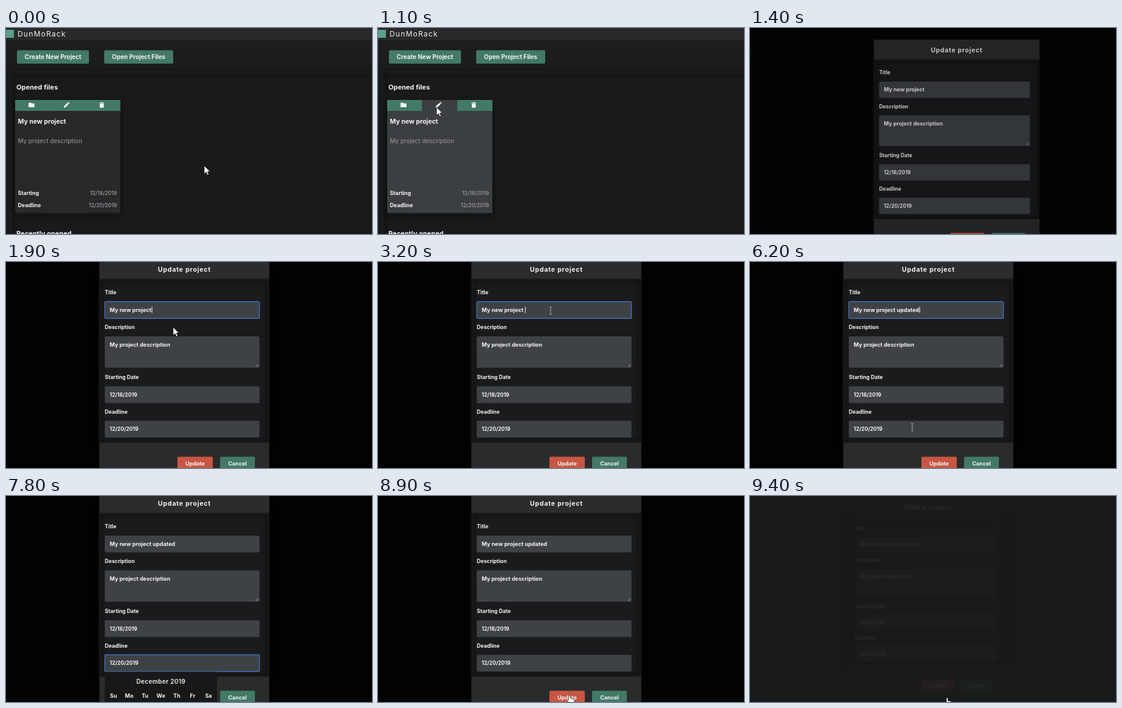
Recreate the animation shown at these times as an HTML page. Size 600 by 338 pixels, loop 9500 ms.

```html
<!DOCTYPE html>
<html lang="en">
<head>
<meta charset="utf-8">
<title>Project board</title>
<style>
  html, body { margin: 0; width: 100%; height: 100%; overflow: hidden; background: #1b1c1d; }
  svg { display: block; width: 600px; height: 338px; }
  text { font-family: Inter, "Open Sans", sans-serif; font-weight: 700; fill: #f1f2f2; white-space: pre; }
</style>
</head>
<body>
<svg viewBox="0 0 600 338" xmlns="http://www.w3.org/2000/svg">
  <defs>
    <filter id="soft" x="-20%" y="-20%" width="140%" height="140%"><feGaussianBlur stdDeviation="5"/></filter>
  </defs>
  <rect width="600" height="338" fill="#1c1d1e"/>
  <g id="page"></g>
  <rect id="shade" width="600" height="338" fill="#020203"/>
  <g id="modal"></g>
  <g id="cursor">
    <path id="arrow" d="M0 0V13.2L3.1 10.4 5.3 15.2 7.5 14.2 5.3 9.6H9.4Z" fill="#fff" stroke="#111" stroke-width=".7"/>
    <path id="beam" d="M-2 -6H-.6L0 -5.4.6 -6H2M0 -5.4V5.4M-2 6H-.6L0 5.4.6 6H2" fill="none" stroke="#b4b8ba" stroke-width=".9"/>
    <path id="hand" d="M0 1Q0 0 1.2 0T2.4 1V5L4.6 5.3 8.4 6.4Q9.6 7 9.4 9L8 14H2L-2.4 8.6Q-2.6 7 -1.2 7.2L0 8.2Z" fill="#fff" stroke="#111" stroke-width=".6"/>
  </g>
</svg>
<script>
const LOOP = 9500, STEP = 100;
const TEAL = "#437968", FIELD = "#3e4244";
const $ = id => document.getElementById(id);

const rect = (x, y, w, h, fill, extra = "") =>
  `<rect x="${x}" y="${y}" width="${w}" height="${h}" fill="${fill}" ${extra}/>`;

// Blurred dark rim of a sunken area.
const rim = (x, y, w, h) =>
  rect(x, y, w, h, "none", 'stroke="#0e0e0f" stroke-width="7" filter="url(#soft)" opacity=".5"');

// Text placed by the vertical middle of its capitals.
const label = (str, x, mid, size, extra = "") =>
  `<text x="${x}" y="${(mid + size * .36).toFixed(2)}" font-size="${size}" ${extra}>${str}</text>`;

const button = (str, x, y, w, h, size, fill) =>
  rect(x, y, w, h, fill, 'rx="2"') +
  label(str, x + w / 2, y + h / 2, size, 'text-anchor="middle"');

const cardDate = (name, date, mid) =>
  label(name, 19.5, mid, 8.8) +
  label(date, 182, mid, 8.5, 'text-anchor="end" style="fill:#909294;font-weight:600"');

$("page").innerHTML =
  rect(8, 73, 700, 400, "#1a1a1b") +
  rim(8, 73, 700, 400) +
  rect(0, 0, 700, 20.5, "#28292b") +
  rect(0, 3, 13, 13, "#5aa18b") +
  label("DunMoRack", 19, 10, 12, 'letter-spacing="1.2" style="font-weight:400"') +
  button("Create New Project", 18, 36.5, 118, 22, 9.9, TEAL) +
  button("Open Project Files", 161, 36.5, 113, 22, 9.9, TEAL) +
  label("Opened files", 17, 97, 11) +
  rect(16, 121, 172, 186, "#0d0d0e", 'filter="url(#soft)" opacity=".7"') +
  rect(15, 118, 172.5, 185.5, "#28292b", 'id="card" rx="2"') +
  rect(15, 118, 57, 18, TEAL) +
  rect(72, 118, 58, 18, TEAL, 'id="edit"') +
  rect(130, 118, 57.5, 18, TEAL) +
  `<g fill="#fff">
    <path d="M37 123.2Q37 122.6 37.8 122.6H40.7L41.8 123.7H45.8Q46.6 123.7 46.6 124.5V129.4Q46.6 130 45.8 130H37.8Q37 130 37 129.4Z"/>
    <path d="M94.8 130.6V128.6L100.4 123 102.5 125.1 96.9 130.6ZM101 122.4 101.9 121.6Q102.3 121.3 102.7 121.6L103.9 122.8Q104.2 123.2 103.9 123.6L103.1 124.5Z"/>
    <path d="M153.2 122.5H155.3L155.9 121.8H158.1L158.7 122.5H160.8V123.6H153.2ZM153.8 124.3H160.2V130Q160.2 130.8 159.4 130.8H154.6Q153.8 130.8 153.8 130Z"/>
  </g>` +
  label("My new project", 19.5, 153, 10.5) +
  label("My project description", 19.5, 185, 9.8, 'style="fill:#8b8d8f;font-weight:500"') +
  cardDate("Starting", "12/18/2019", 271) +
  cardDate("Deadline", "12/20/2019", 291) +
  label("Recently opened", 17, 337, 11);

const fields = [
  { name: "Title", y: 65, h: 27.5, value: "My new project", size: 9.1 },
  { name: "Description", y: 122, h: 51.5, value: "My project description", size: 9 },
  { name: "Starting Date", y: 204, h: 27.5, value: "12/18/2019", size: 8.5 },
  { name: "Deadline", y: 260.5, h: 27.5, value: "12/20/2019", size: 8.5 }
];
const days = ["Su", "Mo", "Tu", "We", "Th", "Fr", "Sa"];

$("modal").innerHTML =
  rect(153, -5.5, 278.5, 380, "#1b1a1c") +
  rim(153, 27, 278, 270) +
  rect(153, -5.5, 278.5, 33, "#2a2c2e") +
  rect(153, 296.5, 278.5, 78, "#292b2c") +
  label("Update project", 292.5, 12, 10.6, 'text-anchor="middle" letter-spacing=".75"') +
  fields.map((f, i) =>
    label(f.name, 162, f.y - 15, 8.7) +
    rect(162, f.y, 253.5, f.h, FIELD, `id="box${i}" rx="1.5" stroke-width="1.4"`) +
    label(f.value, 170, f.y + 13.5, f.size, `id="value${i}"`)
  ).join("") +
  '<path d="M409.5 172L414 167.5M412 172L414 170" stroke="#a5a8aa" stroke-width=".8"/>' +
  rect(0, 0, 1, 10, "#f4f4f4", 'id="caret"') +
  button("Update", 281, 319.5, 58, 22, 9, "#c75643") +
  button("Cancel", 351, 319.5, 57, 22, 9, TEAL) +
  '<g id="calendar">' +
  rect(162, 288.5, 184, 90, "#18171a") +
  label("December 2019", 254, 304, 10, 'text-anchor="middle" letter-spacing=".35" style="font-weight:600"') +
  days.map((d, i) => label(d, 176 + i * 26, 328, 9, 'text-anchor="middle"')).join("") +
  "</g>";

const clamp = v => Math.min(1, Math.max(0, v));
const progress = (t, from, to) => clamp((t - from) / (to - from));
const smooth = k => k * k * (3 - 2 * k);
const between = (v, lo, hi) => v >= lo && v < hi;
const show = (id, on) => $(id).style.display = on ? "" : "none";

// Places where the pointer rests or turns.
const stops = [
  { t: 0, x: 325, y: 226 }, { t: 100, x: 324, y: 209 }, { t: 200, x: 324, y: 209 },
  { t: 1100, x: 96, y: 130 }, { t: 1400, x: -30, y: 70 }, { t: 1900, x: 274, y: 107 },
  { t: 2300, x: 283, y: 80 }, { t: 5000, x: 283, y: 80 }, { t: 5900, x: 266, y: 271 },
  { t: 6600, x: 266, y: 271 }, { t: 6900, x: 282, y: 345 }, { t: 8000, x: 188, y: 345 },
  { t: 8400, x: 195, y: 275 }, { t: 9000, x: 322, y: 331 }
];

function pointerAt(t) {
  const i = stops.findIndex(s => s.t > t);
  if (i < 0) return stops[stops.length - 1];
  const a = stops[i - 1], b = stops[i], k = smooth(progress(t, a.t, b.t));
  return { x: a.x + (b.x - a.x) * k, y: a.y + (b.y - a.y) * k };
}

// The space comes first, then one letter every 200 ms.
const suffix = " updated";
const typedCount = t => t < 3200 ? 0 : Math.max(1, Math.floor((t - 3200) / 200));

function caretOn(t) {
  if (between(t, 2600, 4800)) return true;
  const since = t < 2600 ? t - 1600 : t < 6300 ? t - 4800 : t - 6300;
  return since >= 0 && Math.floor(since / 500) % 2 === 0;
}

function cursorKind(x, y, t) {
  if (t >= 8900) return "hand";
  const inField = t >= 1800 && between(x, 162, 416) &&
    fields.some(f => between(y, f.y, f.y + f.h));
  return inField ? "beam" : "arrow";
}

function render(t) {
  // rest falls from 1 to 0 as the dialog opens, gone rises as it closes.
  const rest = (1 - progress(t, 1100, 1800)) ** 3;
  const gone = progress(t, 9100, 9400) ** 1.5;
  const panX = 226 * (1 - rest), panY = 104.5 * (1 - rest);

  $("page").setAttribute("transform", `translate(${-panX} ${-panY})`);
  show("page", t < 1900);
  $("shade").setAttribute("opacity", (1 - rest ** 1.5) * (1 - .86 * gone));

  const { x, y } = pointerAt(t);
  const px = x + panX, py = y + panY;
  const hover = between(px, 15, 188) && between(py, 118, 304);
  $("card").setAttribute("fill", hover ? "#3c3f41" : "#28292b");
  show("edit", !(hover && between(px, 72, 130) && py < 136));

  const scale = 1 - .134 * rest - .082 * gone;
  const shiftX = 288 * rest + 23.3 * gone, shiftY = 131.6 * rest + 7.3 * gone;
  $("modal").setAttribute("transform", `translate(${shiftX} ${shiftY}) scale(${scale})`);
  $("modal").setAttribute("opacity", (1 - rest) * (1 - .93 * gone));

  $("value0").textContent = fields[0].value + suffix.slice(0, typedCount(t));

  const focus = between(t, 1500, 6300) ? 0 : between(t, 6300, 8300) ? 3 : -1;
  fields.forEach((f, i) => $("box" + i).setAttribute("stroke", i === focus ? "#456fb8" : "none"));

  const blink = focus >= 0 && caretOn(t);
  show("caret", blink);
  if (blink) {
    $("caret").setAttribute("x", 170.4 + $("value" + focus).getComputedTextLength());
    $("caret").setAttribute("y", fields[focus].y + 8.5);
  }

  $("calendar").setAttribute("opacity", progress(t, 6200, 6400) - progress(t, 8000, 8200));

  const kind = cursorKind(x, y, t);
  for (const id of ["arrow", "beam", "hand"]) show(id, id === kind);
  $("cursor").setAttribute("transform", `translate(${x} ${y})`);
}

const start = performance.now();
function tick() {
  const t = (performance.now() - start) % LOOP;
  render(Math.floor(t / STEP) * STEP);
  requestAnimationFrame(tick);
}
tick();
</script>
</body>
</html>
```
